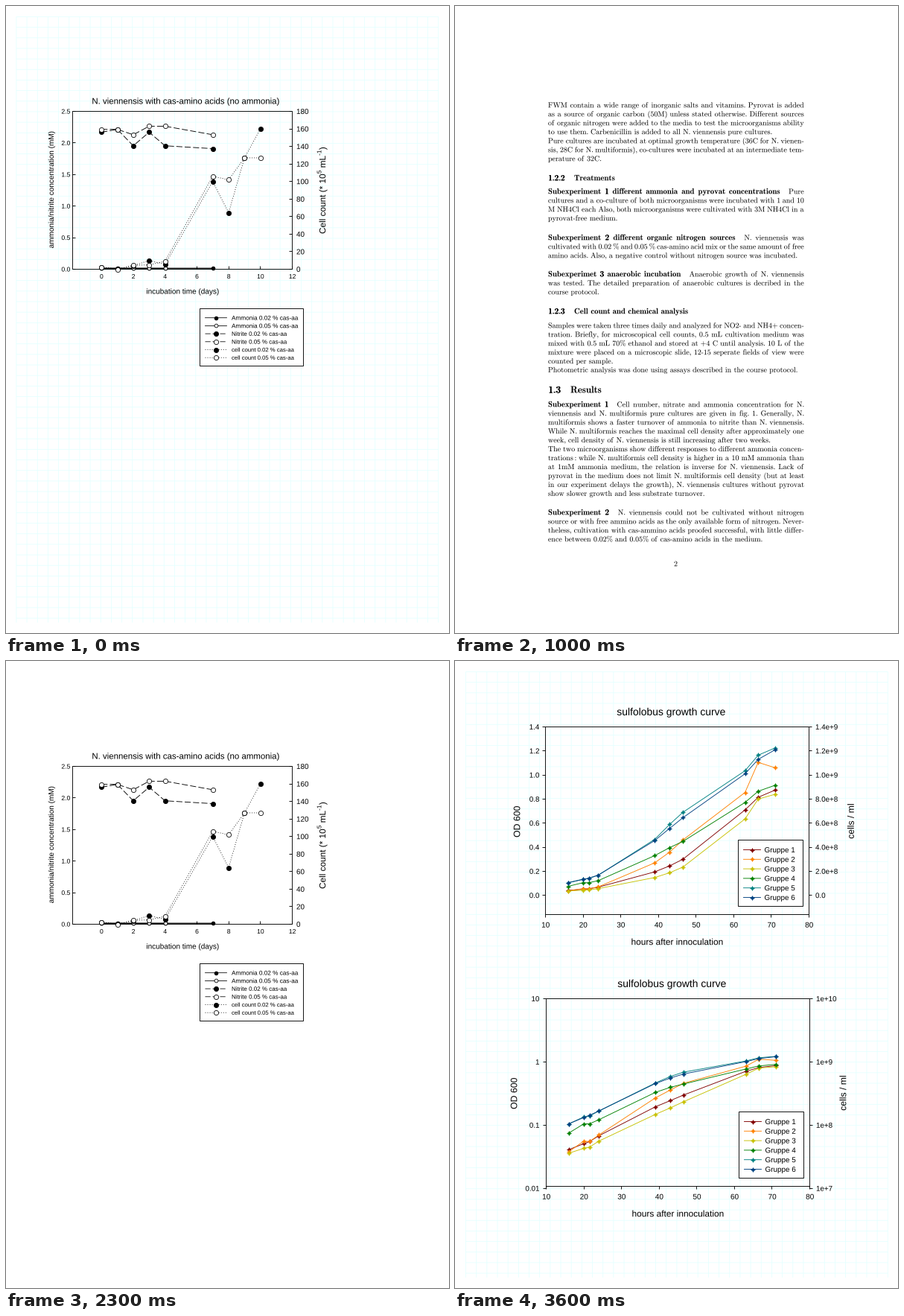
A matplotlib script that plays this animation: 595 px wide and 842 px high, repeating every 3.7 s.

```python
import numpy as np
import matplotlib.pyplot as plt
from matplotlib.animation import FuncAnimation
from matplotlib.patches import PathPatch, Rectangle
from matplotlib.path import Path
from matplotlib.textpath import TextPath
from matplotlib.transforms import Affine2D

W, H, DPI = 595, 842, 64
PX = 72 / DPI  # points per pixel
SANS = {"family": "Liberation Sans"}
plt.rcParams.update({"mathtext.fontset": "cm", "path.snap": False})

fig = plt.figure(figsize=(W / DPI, H / DPI), dpi=DPI, facecolor="white")


def layer():
    ax = fig.add_axes([0, 0, 1, 1])
    ax.set(xlim=(0, W), ylim=(H, 0))
    ax.autoscale(False)
    ax.axis("off")
    return ax


# ---------- drawing helpers ----------

def fill(ax, path):
    ax.add_patch(PathPatch(path, fc="black", lw=0, zorder=3))


def label(ax, x, y, s, size, ha=0.5, rot=0):
    """Sans text centred vertically on its capitals; returns its width."""
    path = TextPath((0, 0), s, size=size, prop=SANS)
    w = path.get_extents().x1
    place = (Affine2D().translate(-ha * w, -0.35 * size).scale(1, -1)
             .rotate_deg(-rot).translate(x, y))
    fill(ax, place.transform_path(path))
    return w


def seg(ax, x, y, color="black", lw=0.8, **kw):
    ax.plot(x, y, color=color, lw=lw * PX, zorder=2, **kw)


def tick(ax, x, y, dx=0, dy=0):
    """Short axis mark, centred on a pixel row or column."""
    if dx:
        y = np.floor(y) + 0.5
    else:
        x = np.floor(x) + 0.5
    seg(ax, [x, x + dx], [y, y + dy], lw=0.9, solid_capstyle="butt")


def box(ax, x0, y0, x1, y1, fc="none"):
    ax.add_patch(Rectangle((x0, y0), x1 - x0, y1 - y0, fc=fc, ec="black",
                           lw=0.9 * PX, zorder=2))


def paper(ax, x0, y0=14.4, step=14.17):
    xs = x0 + step * np.arange(41)
    ys = y0 + step * np.arange(58)
    style = dict(color="#e4ffff", lw=0.8 * PX, zorder=1)
    ax.vlines(xs, y0, 828, **style)
    ax.hlines(ys, x0, 581, **style)


# ---------- nitrogen chart ----------

def dots(ax, x, y, face, size, dash, lw=0.8):
    seg(ax, x, y, lw=lw, marker="o", ms=size * PX, mfc=face, mec="black",
        mew=0.8 * PX, linestyle=dash, dash_capstyle="butt")


SOLID, DASH, DOT = "-", (0, (9, 3.5)), (0, (1.2, 2.6))


def nitrogen_chart(ax):
    left, right, top, base = 89.5, 384.5, 141.5, 353.5

    def px(day):
        return 128.2 + 21.35 * np.asarray(day)

    def conc(v):
        return base - 84.8 * np.asarray(v)

    def cells(v):
        return base - (base - top) / 180 * np.asarray(v)

    box(ax, left, top, right, base)
    for v in np.arange(0, 2.6, 0.5):
        tick(ax, left, conc(v), dx=4)
        label(ax, 86, conc(v), f"{v:.1f}", 8.6, ha=1)
    for v in range(0, 181, 20):
        tick(ax, right, cells(v), dx=-4)
        label(ax, 390, cells(v), str(v), 9.9, ha=0)
    for d in range(0, 13, 2):
        tick(ax, px(d), base, dy=-4)
        label(ax, px(d), 363, str(d), 8.6)

    label(ax, 241, 127.5, "N. viennensis with cas-amino acids (no ammonia)", 11.45)
    label(ax, 237, 383, "incubation time (days)", 10)
    label(ax, 60.5, 247, "ammonia/nitrite concentration (mM)", 10, rot=90)
    y = 306
    for s, dx, size, gap in (("Cell count (* 10", 0, 11.8, 0.6), ("5", -4.5, 8.3, 3.6),
                             ("mL", 0, 11.8, 0.4), ("-1", -4.5, 8.3, 0.8),
                             (")", 0, 11.8, 0)):
        y -= label(ax, 425 + dx, y, s, size, ha=0, rot=90) + gap

    short = [0, 1, 2, 3, 4, 7]
    long = [0, 1, 2, 3, 4, 7, 8, 9, 10]
    seg(ax, px([0, 7]), conc([0.01, 0.01]))
    dots(ax, px(short), conc([0.018] * 6), "black", 4.8, SOLID)
    dots(ax, px([0, 2, 3, 4]), conc([0.015] * 4), "white", 4.8, SOLID)
    dots(ax, px(short), conc([2.17, 2.215, 1.955, 2.17, 1.955, 1.91]),
         "black", 6.2, DASH, 0.9)
    dots(ax, px(short), conc([2.215, 2.215, 2.13, 2.265, 2.265, 2.13]),
         "white", 6.2, DASH, 0.9)
    dots(ax, px(long), cells([2.5, 0.4, 4, 10, 5.5, 100, 64.5, 127, 160]),
         "black", 6.2, DOT)
    dots(ax, px(long), cells([2.5, 0, 4.5, 5, 9, 106, 102, 127, 127]),
         "white", 6.2, DOT)

    box(ax, 260.5, 406.5, 399.5, 483.5, "white")
    rows = (("Ammonia", SOLID, 4.8, 8.2), ("Nitrite", DASH, 6.2, 8.0),
            ("cell count", DOT, 6.2, 7.7))
    for i, (name, dash, ms, size) in enumerate(rows):
        for j, (share, face) in enumerate((("0.02", "black"), ("0.05", "white"))):
            y = 418.7 + 10.7 * (2 * i + j)
            seg(ax, [267.5, 296.5], [y, y], linestyle=dash, dash_capstyle="butt")
            dots(ax, [282], [y], face, ms, SOLID)
            label(ax, 303, y, f"{name} {share} % cas-aa", size, ha=0)


# ---------- growth charts ----------

HOURS = np.array([16, 20, 21.5, 24, 39, 43, 46.5, 63, 66.5, 71])
GROUPS = {
    "#800000": [.041, .051, .055, .068, .195, .245, .30, .71, .815, .875],
    "#ff8000": [.038, .056, .055, .070, .27, .36, .46, .855, 1.105, 1.06],
    "#c8c000": [.036, .043, .045, .056, .148, .188, .235, .635, .80, .84],
    "#008000": [.075, .105, .105, .122, .33, .397, .448, .772, .865, .915],
    "#008080": [.105, .135, .140, .167, .465, .59, .69, 1.035, 1.165, 1.225],
    "#004080": [.105, .132, .143, .168, .455, .557, .645, 1.01, 1.13, 1.21],
}


def growth_chart(ax, left, top, py, ticks, od_x, cells_x, key):
    right, base = left + 354, top + 252

    def px(h):
        return left + 354 / 70 * (h - 10)

    box(ax, left, top, right, base)
    for v, od, count in ticks:
        y = py(v)
        tick(ax, left, y, dx=-4)
        tick(ax, right, y, dx=4)
        label(ax, 113, y, od, 9.8, ha=1)
        label(ax, right + 8.5, y, count, 9.8, ha=0)
    low = py(ticks[0][0])
    if low > base:
        for x in (left, right):
            seg(ax, [x, x], [base, low], lw=0.9)
    for h in range(10, 81, 10):
        tick(ax, px(h), base, dy=4)
        label(ax, px(h), base + 13.7, str(h), 10)

    mid = left + 168.5
    label(ax, mid, top - 20.5, "sulfolobus growth curve", 13.9)
    label(ax, mid + 8, base + 36.5, "hours after innoculation", 11.9)
    label(ax, od_x, top + 127.5, "OD 600", 12.3, rot=90)
    label(ax, cells_x, top + 127, "cells / ml", 12.2, rot=90)

    star = dict(marker=(4, 1, 0), ms=6 * PX, mew=0.5 * PX)
    kx, ky = key
    for color, od in GROUPS.items():
        seg(ax, px(HOURS), py(np.array(od)), color, 0.9, **star)
    box(ax, kx, ky, kx + 87, ky + 89, "white")
    for i, color in enumerate(GROUPS):
        y = ky + 13 + 12.8 * i
        seg(ax, [kx + 7, kx + 30], [y, y], color, 0.9)
        seg(ax, [kx + 18.5], [y], color, **star)
        label(ax, kx + 35, y, f"Gruppe {i + 1}", 9.9, ha=0)


def growth_page(ax):
    def count(k):
        return "0.0" if k == 0 else f"{k / 5:.1f}e+9" if k >= 5 else f"{2 * k}.0e+8"

    linear = [(k / 5, f"{k / 5:.1f}", count(k)) for k in range(8)]
    decades = [(10.0 ** k, f"{10.0 ** k:g}", f"1e+{k + 9}") for k in range(-2, 2)]
    growth_chart(ax, 121.5, 88.5, lambda v: 314.7 - 161.6 * v, linear,
                 83, 531.5, (380.5, 240.5))
    growth_chart(ax, 122.5, 453.5, lambda v: 538.4 - 84.9 * np.log10(v), decades,
                 79, 521, (381.5, 605.5))


# ---------- report pages ----------

LEFT, MEASURE, SIZE, LEAD = 125, 343.7, 9.96, 11.96
cache = {}


def word(s, size, bold):
    """Path and width of one serif word; hyphens are drawn as short bars."""
    key = s, size, bold
    if key not in cache:
        em = size * (1.08 if bold else 1)
        style = r"\mathbf" if bold else r"\mathrm"
        parts, x = [], 0
        for i, piece in enumerate(s.split("-")):
            if i:
                bar = Affine2D().scale(0.26 * em, 0.06 * em)
                bar.translate(x + 0.01 * em, 0.19 * em)
                parts.append(bar.transform_path(Path.unit_rectangle()))
                x += 0.32 * em
            if piece:
                tex = piece.replace("%", r"\%").replace("+", "{+}")
                path = TextPath((x, 0), f"${style}{{{tex}}}$", size=em)
                x = path.get_extents().x1 + 0.03 * em
                parts.append(Path(path.vertices, path.codes))
        if bold and s[0].isdigit():
            # the bold style has no heavy figures: thicken by a shifted copy
            shift = Affine2D().translate(0.07 * em, 0)
            parts += [shift.transform_path(p) for p in parts]
            x += 0.07 * em
        cache[key] = Path.make_compound_path(*parts), x
    return cache[key]


def line(ax, x, y, s, size=SIZE, justify=False):
    """Set one line; what stands before a bar is bold."""
    head, _, tail = s.rpartition("|")
    n = len(head.split())
    words = [word(w, size, i < n) for i, w in enumerate(head.split() + tail.split())]
    extra = 0.67 * size if n and tail else 0
    gap = 0.333 * size
    if justify:
        gap = (MEASURE - extra - sum(w for _, w in words)) / (len(words) - 1)
    paths = []
    for i, (path, w) in enumerate(words):
        if i == n:
            x += extra
        paths.append(Affine2D().scale(1, -1).translate(x, y).transform_path(path))
        x += w + gap
    fill(ax, Path.make_compound_path(*paths))


def para(ax, y, text, shown=None):
    rows = text.strip().split("\n")
    for i, row in enumerate(rows[:shown]):
        line(ax, LEFT, y + 3.3 + i * LEAD, row, justify=i < len(rows) - 1)


def heading(ax, y, number, title, x, size=SIZE):
    line(ax, LEFT, y + 0.33 * size, number + "|", size)
    line(ax, x, y + 0.33 * size, title + "|", size)


METHODS = [
    (133, """FWM contain a wide range of inorganic salts and vitamins. Pyrovat is added
as a source of organic carbon (50M) unless stated otherwise. Different sources
of organic nitrogen were added to the media to test the microorganisms ability
to use them. Carbenicillin is added to all N. viennensis pure cultures."""),
    (181, """Pure cultures are incubated at optimal growth temperature (36C for N. vienen-
sis, 28C for N. multiformis), co-cultures were incubated at an intermediate tem-
perature of 32C."""),
    (249, """Subexperiment 1 different ammonia and pyrovat concentrations|Pure
cultures and a co-culture of both microorganisms were incubated with 1 and 10
M NH4Cl each Also, both microorganisms were cultivated with 3M NH4Cl in a
pyrovat-free medium."""),
    (311, """Subexperiment 2 different organic nitrogen sources|N. viennensis was
cultivated with 0.02 % and 0.05 % cas-amino acid mix or the same amount of free
amino acids. Also, a negative control without nitrogen source was incubated."""),
    (360, """Subexperimet 3 anaerobic incubation|Anaerobic growth of N. viennensis
was tested. The detailed preparation of anaerobic cultures is decribed in the
course protocol."""),
    (429, """Samples were taken three times daily and analyzed for NO2- and NH4+ concen-
tration. Briefly, for microscopical cell counts, 0.5 mL cultivation medium was
mixed with 0.5 mL 70% ethanol and stored at +4 C until analysis. 10 L of the
mixture were placed on a microscopic slide, 12-15 seperate fields of view were
counted per sample."""),
    (488.5, "Photometric analysis was done using assays described in the course protocol."),
]
RESULTS = [
    (535, """Subexperiment 1|Cell number, nitrate and ammonia concentration for N.
viennensis and N. multiformis pure cultures are given in fig. 1. Generally, N.
multiformis shows a faster turnover of ammonia to nitrite than N. viennensis.
While N. multiformis reaches the maximal cell density after approximately one
week, cell density of N. viennensis is still increasing after two weeks."""),
    (594.8, """The two microorganisms show different responses to different ammonia concen-
trations: while N. multiformis cell density is higher in a 10 mM ammonia than
at 1mM ammonia medium, the relation is inverse for N. viennensis. Lack of
pyrovat in the medium does not limit N. multiformis cell density (but at least
in our experiment delays the growth), N. viennensis cultures without pyrovat
show slower growth and less substrate turnover."""),
]
LAST = """Subexperiment 2|N. viennensis could not be cultivated without nitrogen
source or with free ammino acids as the only available form of nitrogen. Never-
theless, cultivation with cas-ammino acids proofed successful, with little differ-
ence between 0.02% and 0.05% of cas-amino acids in the medium."""


def report_page(ax, drop=0, shown=None):
    for y, text in METHODS:
        para(ax, y, text)
    heading(ax, 231, "1.2.2", "Treatments", 160)
    heading(ax, 410, "1.2.3", "Cell count and chemical analysis", 160)
    for y, text in RESULTS:
        para(ax, y + drop, text)
    para(ax, 680 + drop, LAST, shown)
    line(ax, 294, 752.3, "2")


# ---------- layers and page order ----------

LAYERS = {name: layer() for name in
          ("paper a", "paper b", "nitrogen", "growth", "draft", "revised")}
paper(LAYERS["paper a"], 13.9)
paper(LAYERS["paper b"], 14.5)
nitrogen_chart(LAYERS["nitrogen"])
growth_page(LAYERS["growth"])
report_page(LAYERS["draft"])
heading(LAYERS["draft"], 515.5, "1.3", "Results", 155, 11.96)
report_page(LAYERS["revised"], drop=8.2, shown=2)
heading(LAYERS["revised"], 520, "2", "Results", 149, 14.35)

PAGES = {"g": ("paper a", "nitrogen"), "p": ("nitrogen",),
         "s": ("paper b", "growth"), "t": ("draft",), "u": ("revised",)}
ORDER = "gptgpgpp" + "spt" * 3 + "ps" + "gpugpgpp" + "spu" * 3 + "s"


def update(i):
    for name, ax in LAYERS.items():
        ax.set_visible(name in PAGES[ORDER[i]])
    return list(LAYERS.values())


anim = FuncAnimation(fig, update, frames=len(ORDER), interval=100,
                     repeat=True, repeat_delay=0, blit=False)
plt.show()
```
